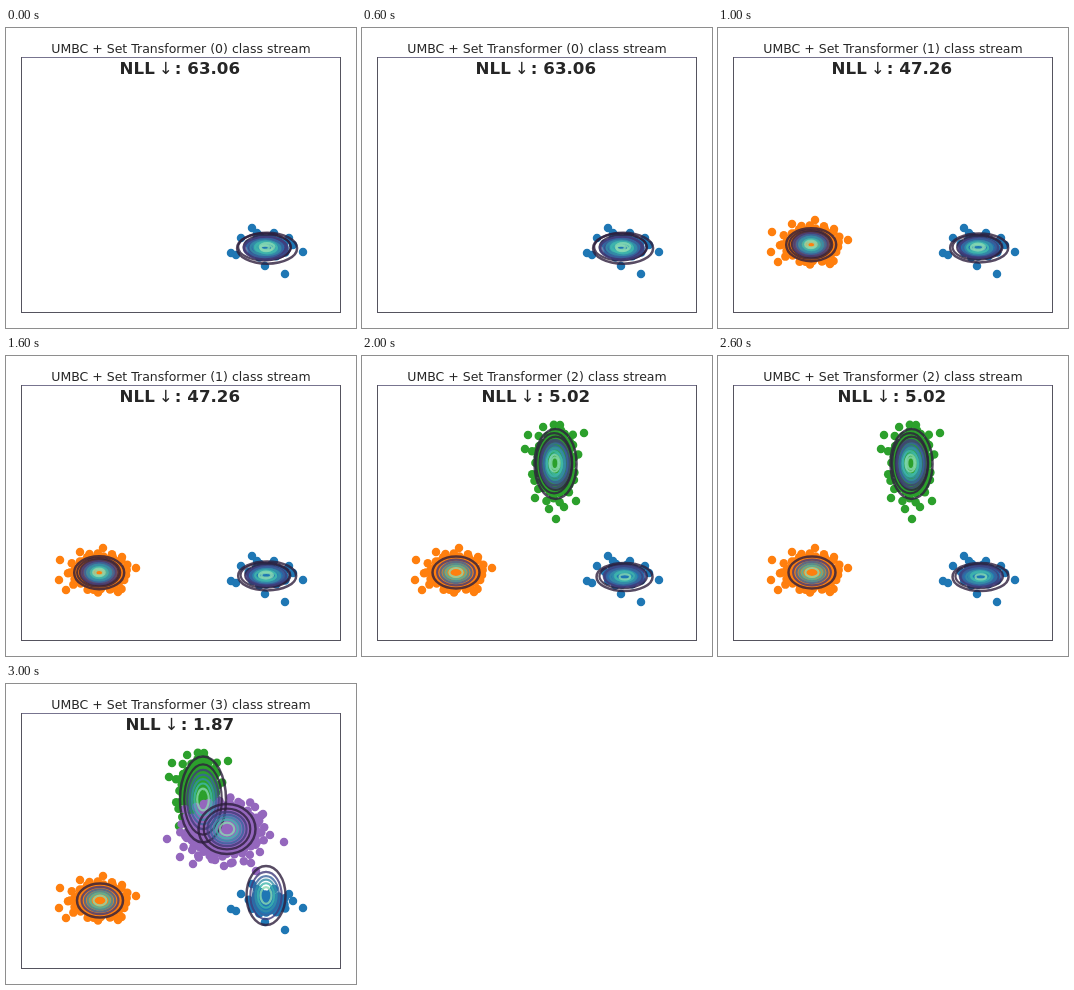
An HTML page that plays this animation: 350 by 300 pixels, repeating every 4000 ms.

```html
<!DOCTYPE html>
<html lang="en">
<head>
<meta charset="utf-8">
<title>Class stream</title>
<style>
  html, body { margin: 0; width: 100%; height: 100%; overflow: hidden; background: #fff; }
  svg { display: block; }
  text { font-family: "DejaVu Sans", sans-serif; fill: #262626; text-anchor: middle; }
  .title { font-size: 12.5px; }
  .score { font-size: 16.67px; font-weight: bold; }
  .arrow { font-weight: normal; }
</style>
</head>
<body>
<svg id="stage" width="350" height="300" viewBox="0 0 350 300"></svg>
<script>
const STEP = 1000;
const GOLDEN = Math.PI * (3 - Math.sqrt(5));
const MAKO = ['#2e1e3c', '#413d7b', '#37659e', '#348fa7', '#40b7ad', '#8ad9b1'];

// a filled core, a loose random edge and a few outliers
const CLASSES = [
  { color: '#1f77b4', cx: 261, cy: 219, rx: 21, ry: 12, core: 30, edge: 0,
    far: [[246, 200], [225, 225], [230, 227], [235, 210], [251, 205], [268, 205],
      [283, 210], [287, 217], [297, 224], [259, 238], [279, 246]] },
  { color: '#ff7f0e', cx: 94, cy: 217, rx: 26, ry: 17, core: 60, edge: 22,
    far: [[54, 204], [53, 224], [60, 234], [74, 196], [97, 192], [116, 201], [130, 212], [112, 236]] },
  { color: '#2ca02c', cx: 193, cy: 107, rx: 20, ry: 33, core: 75, edge: 20,
    far: [[198, 69], [166, 79], [163, 93], [222, 77], [214, 145], [202, 151], [194, 163],
      [187, 153], [173, 142]] },
  { color: '#9467bd', cx: 217, cy: 146, rx: 38, ry: 28, core: 120, edge: 32,
    far: [[161, 155], [174, 173], [187, 180], [218, 182], [245, 179], [264, 151], [278, 158],
      [257, 130], [250, 187]] }
];

// rings: cx, cy, rx, ry, count, wobble
const STATES = [
  { nll: '63.06', rings: [[260, 219.5, 30, 15.5, 18, 1.6]] },
  { nll: '47.26', rings: [[260.5, 219.5, 29, 14.5, 13, 1], [93, 216.5, 25, 16.5, 14, 0.3]] },
  { nll: '5.02', rings: [[262, 220.5, 28, 14, 11, 0.8], [94, 216.5, 23.5, 16, 6, 0],
    [193, 107.5, 21, 35, 13, 0.8]] },
  { nll: '1.87', rings: [[260, 211.5, 19.5, 29.5, 6, 0], [94, 216.5, 23, 17, 6, 0],
    [197, 115.5, 23, 43, 7, 0], [221, 145, 28.5, 25, 7, 0]] }
];

function add(parent, tag, attrs, text) {
  const el = document.createElementNS('http://www.w3.org/2000/svg', tag);
  for (const key in attrs) el.setAttribute(key, attrs[key]);
  if (text) el.textContent = text;
  return parent.appendChild(el);
}

function seeded(seed) {
  return () => (seed = (seed * 16807) % 2147483647) / 2147483647;
}

function drawDots(parent, c, index) {
  const rand = seeded(4211 + 977 * index);
  const g = add(parent, 'g', { fill: c.color });
  const dot = (x, y) => add(g, 'circle', { cx: x, cy: y, r: 4.25 });
  const polar = (r, a) => dot(c.cx + c.rx * r * Math.cos(a), c.cy + c.ry * r * Math.sin(a));
  for (let i = 0; i < c.core; i++) polar(Math.sqrt(i / c.core), i * GOLDEN);
  for (let i = 0; i < c.edge; i++) polar(1 + 0.25 * rand(), (i + rand()) / c.edge * 2 * Math.PI);
  c.far.forEach(([x, y]) => dot(x, y));
}

// radii of equally spaced density levels of a Gaussian
function drawRings(parent, [cx, cy, rx, ry, count, wobble]) {
  const g = add(parent, 'g', { fill: 'none', 'stroke-opacity': 0.8 });
  for (let k = 1; k <= count; k++) {
    const size = Math.sqrt(1 - Math.log(k) / Math.log(count + 1));
    const tone = Math.floor((k - 1) / count * MAKO.length);
    add(g, 'ellipse', {
      cx: cx + wobble * Math.sin(k * 2.4),
      cy: cy + wobble * Math.sin(k * 1.9) / 2,
      rx: rx * size, ry: ry * size,
      stroke: MAKO[tone], 'stroke-width': k > 1 ? 2.2 : 2.5
    });
  }
}

function drawState(state, index) {
  const g = add(stage, 'g', {});
  add(g, 'text', { class: 'title', x: 175, y: 25 },
    `UMBC + Set Transformer (${index}) class stream`);
  const score = add(g, 'text', { class: 'score', x: 173.8, y: 46 });
  add(score, 'tspan', {}, 'NLL');
  add(score, 'tspan', { class: 'arrow', dx: 4.3 }, '↓');
  add(score, 'tspan', { dx: 1.8 }, `: ${state.nll}`);
  CLASSES.slice(0, index + 1).forEach((c, i) => drawDots(g, c, i));
  state.rings.forEach(r => drawRings(g, r));
  return g;
}

const stage = document.getElementById('stage');
add(stage, 'rect', { width: 350, height: 300, fill: '#fff' });
add(stage, 'rect', { x: 15.5, y: 29.5, width: 319, height: 255, fill: 'none', stroke: '#55535e' });
add(stage, 'path', { d: 'M16 29.5H334', stroke: '#77748f' });
const layers = STATES.map(drawState);

const start = performance.now();
function tick() {
  const now = Math.floor((performance.now() - start) / STEP) % layers.length;
  layers.forEach((g, i) => g.style.display = i === now ? '' : 'none');
  requestAnimationFrame(tick);
}
tick();
</script>
</body>
</html>
```
